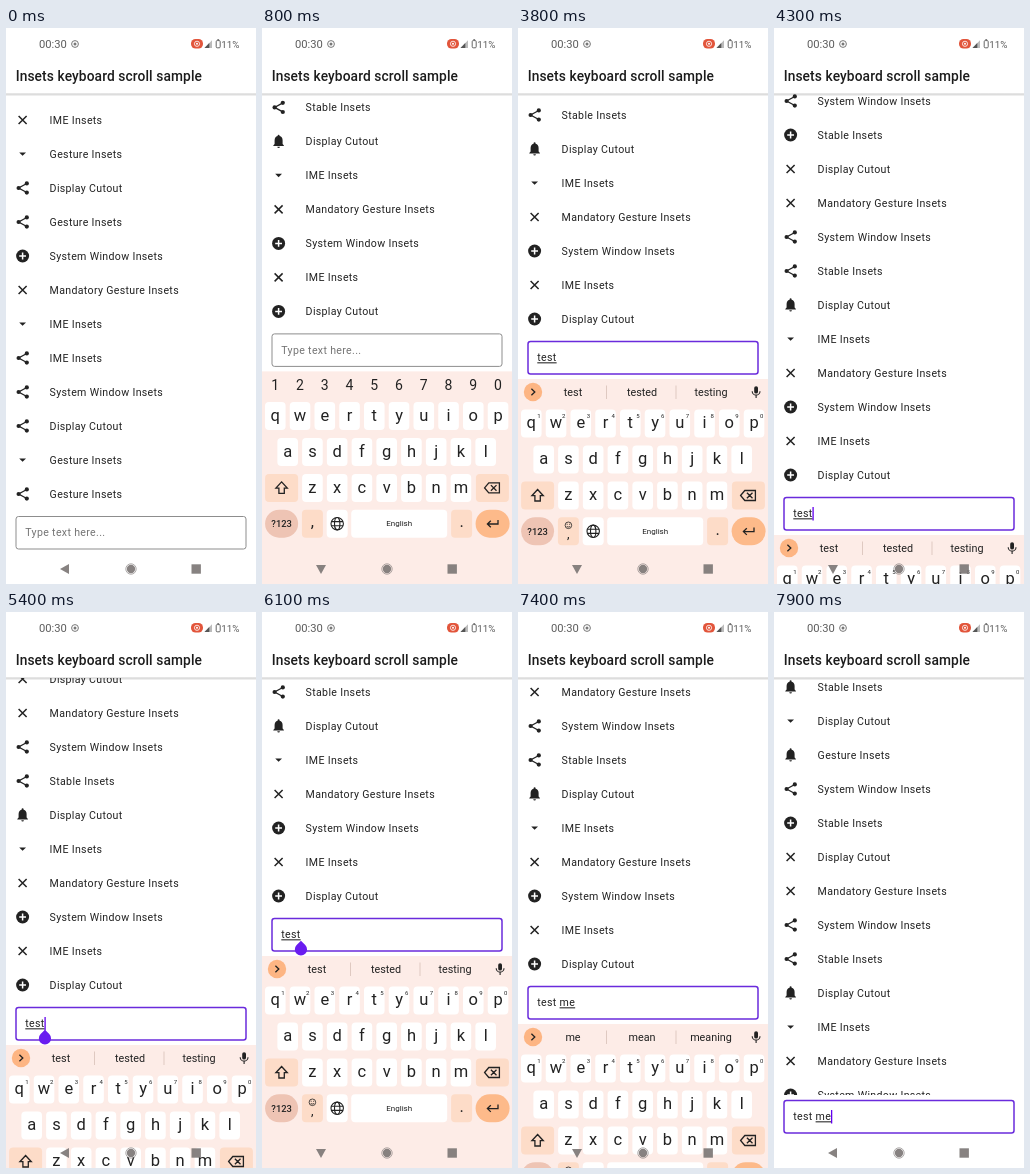
An HTML page that plays this animation: 250 by 556 pixels, repeating every 8 s.

```html
<!DOCTYPE html>
<html lang="en">
<head>
<meta charset="utf-8">
<title>Insets keyboard scroll sample</title>
<style>
  html, body { margin: 0; width: 100%; height: 100%; overflow: hidden; background: #fff; }
  svg { display: block; width: 100%; height: 100%; }
  text { font-family: Roboto, "Noto Sans", sans-serif; fill: #222; white-space: pre; }
  .mid { text-anchor: middle; }
  .body { font-size: 10.6px; letter-spacing: .33px; }
  .title { font-size: 13.75px; font-weight: 500; letter-spacing: .1px; fill: #1c1c1c; }
  .key { font-size: 16.5px; }
  .digit { font-size: 14px; }
  .sup { font-size: 6px; }
  .word { font-size: 10.8px; }
  .line { fill: none; stroke: #222; stroke-width: 1.3; }
  .pop { filter: drop-shadow(0 1px 1.5px rgba(0, 0, 0, .3)); }
  .under { text-decoration: underline; }
</style>
</head>
<body>
<svg viewBox="0 0 250 556">
  <defs>
    <linearGradient id="shade" x2="0" y2="1">
      <stop stop-color="#000" stop-opacity=".2"/>
      <stop offset="1" stop-color="#000" stop-opacity="0"/>
    </linearGradient>
    <g id="cross"><path class="line" d="M-4-4L4 4M4-4L-4 4" style="stroke-width:1.5"/></g>
    <g id="drop"><path d="M-3.4-1.6H3.4L0 1.8z" fill="#222"/></g>
    <g id="share" fill="#222">
      <path class="line" d="M4.2-4.5L-4 0L4.2 4.5"/>
      <circle cx="-4" r="2.1"/><circle cx="4.2" cy="-4.6" r="2.1"/><circle cx="4.2" cy="4.6" r="2.1"/>
    </g>
    <g id="add"><circle r="6.5" fill="#222"/><path d="M-3.4 0H3.4M0-3.4V3.4" stroke="#fff" stroke-width="1.5"/></g>
    <g id="bell"><path fill="#222" d="M-1.3 5.3H1.3A1.3 1.3 0 0 1-1.3 5.3zM4 2.6V-1C4-3.2 3-4.8 1-5.3V-5.7A1 1 0 0 0-1-5.7V-5.3C-3-4.8-4-3.2-4-1V2.6L-5.3 4V4.6H5.3V4z"/></g>
  </defs>

  <rect width="250" height="556" fill="#fff"/>
  <g id="list"></g>

  <rect width="250" height="66" fill="#fff"/>
  <rect y="65.5" width="250" height="3" fill="url(#shade)"/>
  <text class="title" x="9.7" y="53.2">Insets keyboard scroll sample</text>
  <g>
    <text x="33" y="20" font-size="11.2" style="fill:#5c5c5c">00:30</text>
    <circle cx="69" cy="16" r="3.4" fill="none" stroke="#777"/>
    <circle cx="69" cy="16" r="1.5" fill="#777"/>
    <rect x="185" y="11" width="12" height="9.6" rx="4.5" fill="#e2553b"/>
    <circle cx="191" cy="15.8" r="2.6" fill="none" stroke="#fff" stroke-width=".8"/>
    <circle cx="191" cy="15.8" r="1" fill="#fff"/>
    <path d="M198.5 20L206 12.3V20z" fill="#bbb"/><path d="M198.5 20L203.3 15V20z" fill="#555"/>
    <rect x="210.2" y="12.6" width="4" height="7.2" rx="1" fill="none" stroke="#666"/>
    <path d="M211.3 11.7H213.1" stroke="#666"/>
    <text x="233.5" y="19.7" font-size="9.8" text-anchor="end" style="fill:#5c5c5c">11%</text>
  </g>

  <g id="field">
    <rect y="-5.5" width="250" height="100" fill="#fff"/>
    <rect id="box" x="10" y="0" width="230" height="32.5" rx="2.5" fill="#fff"/>
    <text id="hint" class="body" x="19.3" y="19.8" style="fill:#757575">Type text here...</text>
    <text id="typed" class="body" x="19.3" y="19.8"><tspan id="done"></tspan><tspan id="part" class="under"></tspan></text>
    <rect id="cursor" y="9.5" width="1.3" height="13.5" fill="#6200ee"/>
  </g>
  <g id="keyboard"></g>
  <path id="handle" fill="#6a1cf0" d="M0 0L4.3 4.3A6.1 6.1 0 1 1-4.3 4.3z"/>
  <g fill="#7d7877" opacity=".92">
    <path id="back" d="M-5 0L4-5V5z"/>
    <circle cx="125" cy="541" r="4.2"/>
    <circle cx="125" cy="541" r="5.2" fill="none" stroke="#7d7877" stroke-width=".9" opacity=".75"/>
    <rect x="185.5" y="536.3" width="9.4" height="9.4"/>
  </g>
</svg>
<script>
(() => {
const $ = id => document.getElementById(id);
const LOOP = 8000, STEP = 100, ROW = 34, PITCH = 24.75, NAV_TOP = 526, TEXT_X = 19.3;

// Rows from the bottom of the list upwards: label letter + icon letter.
const labels = { I: 'IME', G: 'Gesture', D: 'Display Cutout', W: 'System Window', M: 'Mandatory Gesture', S: 'Stable' };
const icons = { x: 'cross', v: 'drop', s: 'share', p: 'add', b: 'bell' };
const rows = ('Dp Ix Wp Mx Iv Db Ss Ws Mx Dx Sp Ws Gb Dv Sb ' +
  'Gs Gv Ds Ws Is Iv Mx Wp Gs Ds Gv Ix').split(' ');
$('list').innerHTML = rows.map(([name, icon], i) => {
  const label = labels[name] + (name === 'D' ? '' : ' Insets');
  return `<g transform="translate(0 ${-ROW * i})"><use href="#${icons[icon]}" x="16.6"/>` +
    `<text class="body" x="43.6" y="3.9">${label}</text></g>`;
}).join('');

// Keyboard, drawn relative to its top edge.
const label = (s, x, y, cls, extra = '') => `<text class="mid ${cls}" x="${x}" y="${y}" ${extra}>${s}</text>`;
const cap = (x, y, w, fill, r = 4) =>
  `<rect x="${x - w / 2}" y="${y - 14}" width="${w}" height="28" rx="${r}" fill="${fill}"/>`;
const PEACH = '#fddcc8', BG = '#fdece7';
const colX = i => 13.3 + PITCH * i;
const keys = {};
[['qwertyuiop', 0], ['asdfghjkl', .5], ['zxcvbnm', 1.5]].forEach(([chars, col], r) =>
  [...chars].forEach((c, i) => { keys[c] = { x: colX(col + i), y: 44.5 + 36 * r }; }));

const letters = Object.entries(keys).map(([c, k]) =>
  cap(k.x, k.y, 20.6, '#fff') + label(c, k.x, k.y + 4.8, 'key', `id="key-${c}"`)).join('');
const digits = [...'1234567890'];

$('keyboard').innerHTML = `
  <rect width="250" height="230" fill="${BG}"/>
  <g id="digits">${digits.map((d, i) => label(d, colX(i), 18.2, 'digit')).join('')}</g>
  <g id="strip">
    <circle cx="15" cy="13" r="9.2" fill="#fdb583"/>
    <path class="line" d="M13.4 9.8L16.8 13L13.4 16.2"/>
    <rect x="236.2" y="7.2" width="3.8" height="7.4" rx="1.9" fill="#222"/>
    <path class="line" d="M234.2 12.2A3.9 3.9 0 0 0 242 12.2M238.1 16V19" style="stroke-width:1.1"/>
  </g>
  <g id="words">
    <path d="M88.5 6.5V20M158 6.5V20" stroke="#dfc9c1"/>
    ${[55, 124, 193].map((x, i) => label('', x, 16.8, 'word', `id="word${i}"`)).join('')}
  </g>
  ${letters}
  <g id="sups">${digits.map((d, i) => label(d, colX(i) + 7.6, 38.5, 'sup')).join('')}</g>
  ${cap(19.6, 116.5, 33, PEACH)}
  <path class="line" d="M19.6 110.5L25.3 116.7H22.3V122H16.9V116.7H13.9z"/>
  ${cap(230.4, 116.5, 33, PEACH)}
  <path class="line" d="M222.6 116.5L226.8 111.5H237.4V121.5H226.8zM228.9 113.7L234.5 119.3M234.5 113.7L228.9 119.3"/>
  ${cap(19.6, 152.3, 33, '#eec4b4', 14)}${label('?123', 19.6, 155.6, '', 'font-size="9.4" font-weight="500"')}
  ${cap(50.4, 152.3, 21, PEACH)}
  ${label(',', 50.4, 156, 'key', 'id="comma"')}
  <g id="smile" transform="translate(50.4 146.3)" style="stroke-width:.8">
    <path d="M-3.3 0A3.3 3.3 0 1 1 3.3 0A3.3 3.3 0 1 1-3.3 0M-1.7 .7A1.9 1.9 0 0 0 1.7 .7M-1.2-1.5V-.5M1.2-1.5V-.5" fill="none" stroke="#222"/>
  </g>
  ${cap(75.2, 152.3, 21, '#fff')}
  <g class="line" transform="translate(75.2 152.3)" style="stroke-width:1.1">
    <circle r="6.2"/><ellipse rx="2.7" ry="6.2"/><path d="M-5.8-2.1H5.8M-5.8 2.1H5.8"/>
  </g>
  ${cap(137.2, 152.3, 96, '#fff')}${label('English', 137.2, 155.1, '', 'font-size="8"')}
  ${cap(199.6, 152.3, 21, PEACH)}${label('.', 199.6, 156, 'key')}
  ${cap(230.6, 152.3, 34, '#fdba8a', 14)}
  <path class="line" d="M236 148.5V152.6H225.6M228.8 149.3L225.4 152.6L228.8 155.9"/>
  <g id="popup">
    <circle class="pop" r="24" fill="#fff"/>
    ${label('', 0, 5.5, '', 'id="popChar" font-size="21"')}${label('...', 0, 18.5, '', 'font-size="9"')}
  </g>`;

// Motion knots: [time, value], linear between.
const keyboardTop = [[0, 556], [400, 556], [500, 500], [600, 428], [700, 368], [800, 343.4], [3700, 343.4],
  [3800, 351], [3900, 374], [4000, 402], [4200, 469], [4300, 507], [4400, 538], [4500, 556],
  [5200, 556], [5300, 524], [5400, 433], [5500, 372], [5600, 349], [5700, 344], [7100, 344],
  [7200, 352], [7300, 376], [7400, 412], [7600, 502], [7700, 556]];
const listScroll = [[0, 510], [100, 465], [200, 350], [300, 195], [400, 60], [500, 0],
  [7600, 0], [7700, 12], [7800, 48], [7900, 85]];

// Typing: [time, finished text, composing text, pressed key, suggestions].
const typing = [
  [0, '', '', '', ''],
  [2700, '', '', 't', ''],
  [2800, '', 't', 'e', 't the to'],
  [2900, '', 'te', 's', 'te test the'],
  [3000, '', 'tes', 't', 'tes test yes'],
  [3100, '', 'test', '', 'test tested testing'],
  [6400, 'test ', '', '', 'the is and'],
  [6500, 'test ', '', 'm', 'the is and'],
  [6600, 'test ', 'm', '', 'm me my'],
  [6700, 'test ', 'm', 'e', 'm me my'],
  [6800, 'test ', 'me', '', 'me mean meaning']];
const blinkStarts = [1900, 2800, 2900, 3000, 3100, 5600, 6400, 6600, 6800];

const lastBefore = (list, t, time = x => x) => list.filter(x => time(x) <= t).pop();
const within = (t, a, b) => t >= a && t < b;
const show = (id, on) => $(id).setAttribute('visibility', on ? 'visible' : 'hidden');
const move = (id, x, y, more = '') => $(id).setAttribute('transform', `translate(${x} ${y}) ${more}`);

function sample(knots, t) {
  const i = knots.findIndex(k => k[0] > t);
  if (i < 0) return knots[knots.length - 1][1];
  const [t0, a] = knots[i - 1], [t1, b] = knots[i];
  return a + (b - a) * (t - t0) / (t1 - t0);
}

function render(t) {
  const kb = sample(keyboardTop, t), base = Math.min(kb, NAV_TOP), fieldY = base - 37.5;
  const focused = t >= 1900, textMode = t >= 2000;
  const [, done, part, pressed, words] = lastBefore(typing, t, s => s[0]);

  move('list', 0, base - 60 + sample(listScroll, t));
  move('field', 0, fieldY);
  move('keyboard', 0, kb);

  $('box').setAttribute('stroke', focused ? '#6a2bdc' : '#8d8d8d');
  $('box').setAttribute('stroke-width', focused ? 1.5 : 1);
  $('done').textContent = done;
  $('part').textContent = part;
  show('hint', !done && !part);

  const typedEnd = TEXT_X + (done || part ? $('typed').getComputedTextLength() : 0);
  $('cursor').setAttribute('x', typedEnd - .2);
  show('cursor', focused && Math.floor((t - lastBefore(blinkStarts, t)) / 500) % 2 === 0);
  show('handle', within(t, 5300, 6400));
  move('handle', typedEnd + .3, fieldY + 22.3);

  show('digits', !textMode);
  ['strip', 'sups', 'smile'].forEach(id => show(id, textMode));
  $('comma').setAttribute('y', textMode ? 158.5 : 156);
  $('comma').style.fontSize = textMode ? '13px' : '';
  show('words', words);
  words.split(' ').forEach((w, i) => { $('word' + i).textContent = w; });

  for (const c in keys) $('key-' + c).style.fill = c === pressed ? '#bdb8b6' : '';
  show('popup', pressed);
  if (pressed) {
    $('popChar').textContent = pressed;
    move('popup', keys[pressed].x, keys[pressed].y - 41);
  }

  const opened = within(t, 800, 4500) || within(t, 5700, 7700);
  move('back', 59, 541, `rotate(${opened ? -90 : 0})`);
}

const start = performance.now();
function tick() {
  const t = (performance.now() - start) % LOOP;
  render(Math.floor(t / STEP) * STEP);
  requestAnimationFrame(tick);
}
tick();
})();
</script>
</body>
</html>
```
